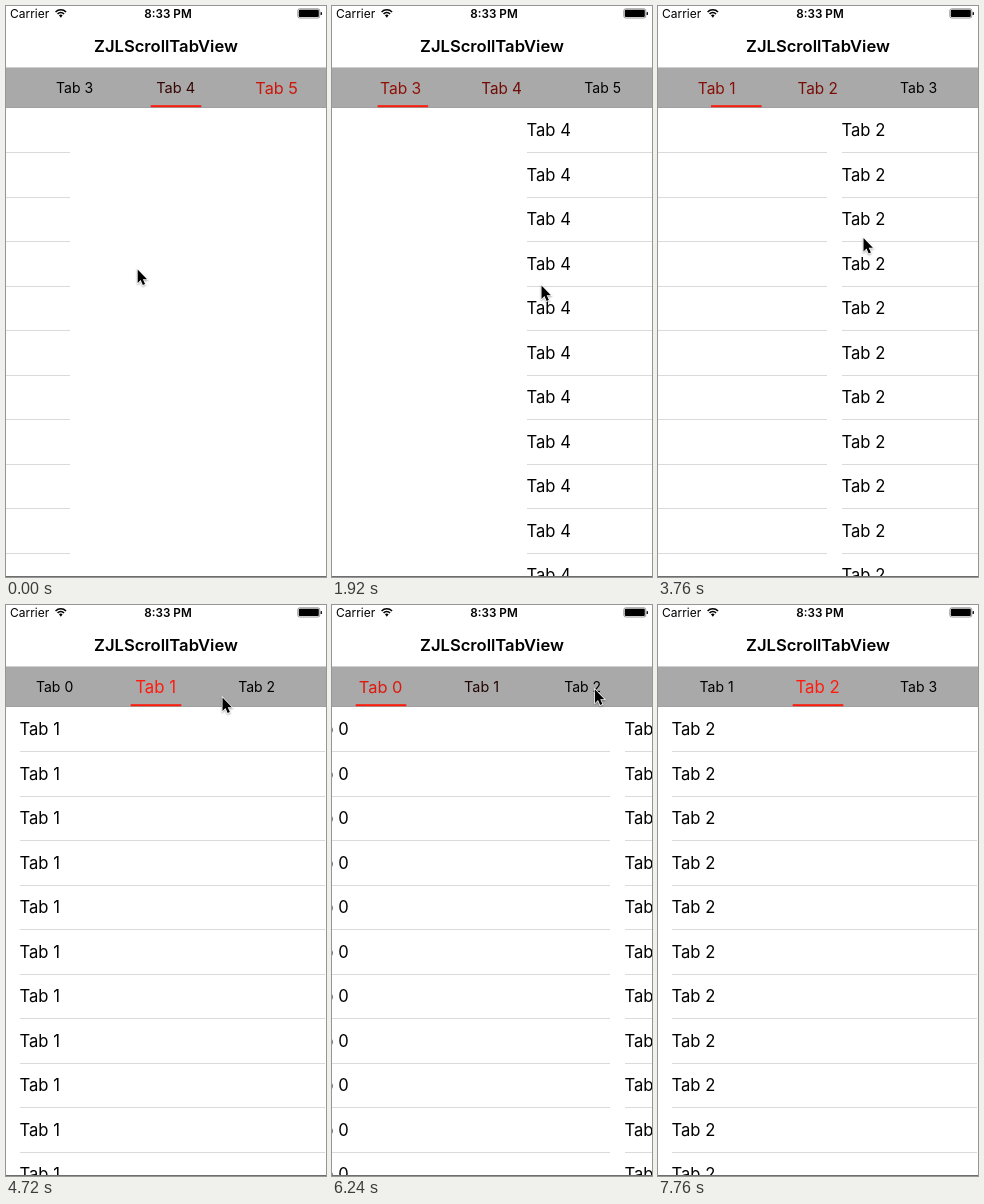
These frames come from a looping animation (320 by 571 pixels, 7.84 s). An HTML page with a canvas:

```html
<!DOCTYPE html>
<html lang="en">
<head>
<meta charset="utf-8">
<title>Scroll tabs</title>
<style>
html, body { margin: 0; width: 100%; height: 100%; overflow: hidden; background: #fff; }
canvas { display: block; width: 320px; height: 571px; }
</style>
</head>
<body>
<canvas id="stage"></canvas>
<script>
const W = 320, H = 571, LOOP = 7840, STEP = 80;
const SWIPE = 480, TAP = 300, SETTLE = 250, DRAG = 180;
const TABS = 6, TAB_W = 101, TAB_X = 49, ROW_H = 44.5, LIST_Y = 102, INSET = 15;
const FONT = 'Inter, Roboto, sans-serif';

const canvas = document.getElementById('stage');
const ctx = canvas.getContext('2d');
const dpr = window.devicePixelRatio || 1;
canvas.width = W * dpr;
canvas.height = H * dpr;

// A swipe drags the pointer from press to release; rest is where it drifts later
const swipe = (from, to, start, bend, press, release, rest) =>
  ({ from, to, start, dur: SWIPE, bend, press, release, rest });
const tap = (from, to, start, press, rest) =>
  ({ from, to, start, dur: TAP, bend: 1, press, release: press, rest });

const moves = [
  swipe(4, 5, -150, 0.295, [200, 263.5], [118, 263.5]),
  swipe(5, 4, 1010, 0.83, [70, 272], [210, 275]),
  swipe(4, 3, 1690, 0.83, [36, 282], [209.5, 279.5]),
  swipe(3, 2, 2592, 1.02, [90, 180], [224.5, 173.5]),
  swipe(2, 1, 3580, 0.667, [34, 238], [205.5, 232], [216.5, 92.5]),
  tap(1, 0, 5242, [54, 81]),
  tap(0, 2, 6193.5, [263, 84.5], [300, 46])
];
const FIRST = moves[0].from;
const unseen = [3, 5];

const clamp = (v, lo, hi) => Math.min(hi, Math.max(lo, v));
const mix = (a, b, u) => a + (b - a) * u;
const ease = u => { u = clamp(u, 0, 1); return u * u * (3 - 2 * u); };
const tabCenter = i => TAB_X + TAB_W * i;
const barOffset = i => clamp(tabCenter(i) - W / 2, 0, tabCenter(TABS - 1) + TAB_X - W);

function pageAt(t) {
  return moves.reduce((page, m) => {
    const u = clamp((t - m.start) / m.dur, 0, 1);
    return page + (m.to - m.from) * ease(u ** m.bend);
  }, FIRST);
}

function barAt(t) {
  return moves.reduce((x, m) =>
    x + (barOffset(m.to) - barOffset(m.from)) * ease((t - m.start - m.dur) / SETTLE),
    barOffset(FIRST));
}

// The underline follows the whole part of the page position
function underlineAt(t) {
  let pos = FIRST;
  for (const m of moves) {
    const n = Math.abs(m.to - m.from), dir = Math.sign(m.to - m.from);
    for (let j = 0; j < n; j++) {
      const when = m.start + m.dur * (dir > 0 ? j + 1 : j) / n;
      pos += dir * ease((t - when) / SETTLE);
    }
  }
  return pos;
}

// Unseen pages fill in once the first move onto them ends
function isLoaded(i, t) {
  if (!unseen.includes(i)) return true;
  const m = moves.find(m => m.to === i);
  return t >= m.start + m.dur;
}

function pointerAt(t) {
  let pos = moves[0].press;
  const glide = (to, start, dur) => {
    const u = clamp((t - start) / dur, 0, 1);
    pos = pos.map((v, k) => mix(v, to[k], u));
  };
  for (const m of moves) {
    glide(m.press, m.start - 300, 200);
    glide(m.release, m.start, DRAG);
    if (m.rest) glide(m.rest, m.start + 850, 240);
  }
  return pos;
}

function text(str, x, y, size, { color = '#000', align = 'left', weight = 400 } = {}) {
  ctx.font = `${weight} ${size}px ${FONT}`;
  ctx.textAlign = align;
  ctx.fillStyle = color;
  ctx.fillText(str, x, y + size * 0.364);
}

function rect(x, y, w, h, color) {
  ctx.fillStyle = color;
  ctx.fillRect(x, y, w, h);
}

function drawPages(page, t) {
  for (let i = 0; i < TABS; i++) {
    const x = Math.round((i - page) * W) - 1;
    if (Math.abs(x) > W || !isLoaded(i, t)) continue;
    for (let y = LIST_Y; y < H; y += ROW_H) {
      text(`Tab ${i}`, x + INSET - 0.5, y + 22.4, 16.6);
      rect(x + INSET, Math.floor(y + ROW_H), W - INSET, 1, '#dadadc');
    }
  }
}

function drawTabs(page, t) {
  rect(0, 61, W, 1, '#cfcfcf');
  rect(0, 62, W, 40, '#a9a9a9');
  rect(0, 101, W, 1, '#a0a0a0');
  const shift = barAt(t);
  for (let i = 0; i < TABS; i++) {
    const on = Math.max(0, 1 - Math.abs(page - i));
    const color = `rgb(${255 * on}, ${28 * on}, ${14 * on})`;
    text(`Tab ${i}`, tabCenter(i) - shift - 0.4, 82, 14 * (1 + 0.2 * on), { color, align: 'center' });
  }
  rect(tabCenter(underlineAt(t)) - shift - 25.3, 99.2, 50.6, 2, '#fc1c0e');
}

function drawHeader() {
  rect(0, 0, W, 61, '#fff');
  text('Carrier', 4, 7.5, 12);
  text('8:33 PM', 162, 7.5, 11.7, { align: 'center', weight: 600 });
  text('ZJLScrollTabView', 160, 39.6, 16.6, { align: 'center', weight: 600 });

  ctx.strokeStyle = '#000';
  ctx.lineWidth = 1.6;
  const fan = r => ctx.arc(54.8, 11.2, r, -Math.PI * 0.75, -Math.PI * 0.25);
  for (const r of [4.6, 7.4]) {
    ctx.beginPath();
    fan(r);
    ctx.stroke();
  }
  ctx.fillStyle = '#000';
  ctx.beginPath();
  ctx.moveTo(54.8, 11.8);
  fan(2.6);
  ctx.fill();

  ctx.strokeStyle = '#555';
  ctx.lineWidth = 0.6;
  ctx.beginPath();
  ctx.roundRect(291.8, 2.8, 22, 9.2, 2);
  ctx.stroke();
  ctx.beginPath();
  ctx.roundRect(292.8, 3.8, 20, 7.2, 1);
  ctx.roundRect(314.6, 5.9, 1.3, 3.2, 0.6);
  ctx.fill();
}

function drawPointer(t) {
  const last = moves[moves.length - 1];
  if (t > last.start + 1080) return;
  const arrow = new Path2D('M0 0V13.4L3 10.6L5.2 15.6L7.4 14.6L5.2 9.8H9.4Z');
  ctx.save();
  ctx.translate(...pointerAt(t));
  ctx.shadowColor = 'rgba(0,0,0,.35)';
  ctx.shadowBlur = 2 * dpr;
  ctx.shadowOffsetY = dpr;
  ctx.strokeStyle = '#fff';
  ctx.lineWidth = 1.4;
  ctx.stroke(arrow);
  ctx.shadowColor = 'transparent';
  ctx.fillStyle = '#000';
  ctx.fill(arrow);
  ctx.restore();
}

function draw(t) {
  const page = pageAt(t);
  ctx.setTransform(dpr, 0, 0, dpr, 0, 0);
  rect(0, 0, W, H, '#fff');
  drawPages(page, t);
  drawTabs(page, t);
  drawHeader();
  rect(0, 570, W, 1, '#6e6e6e');
  drawPointer(t);
}

const began = performance.now();
function tick() {
  const t = (performance.now() - began) % LOOP;
  draw(Math.floor(t / STEP) * STEP);
  requestAnimationFrame(tick);
}
tick();
</script>
</body>
</html>
```
